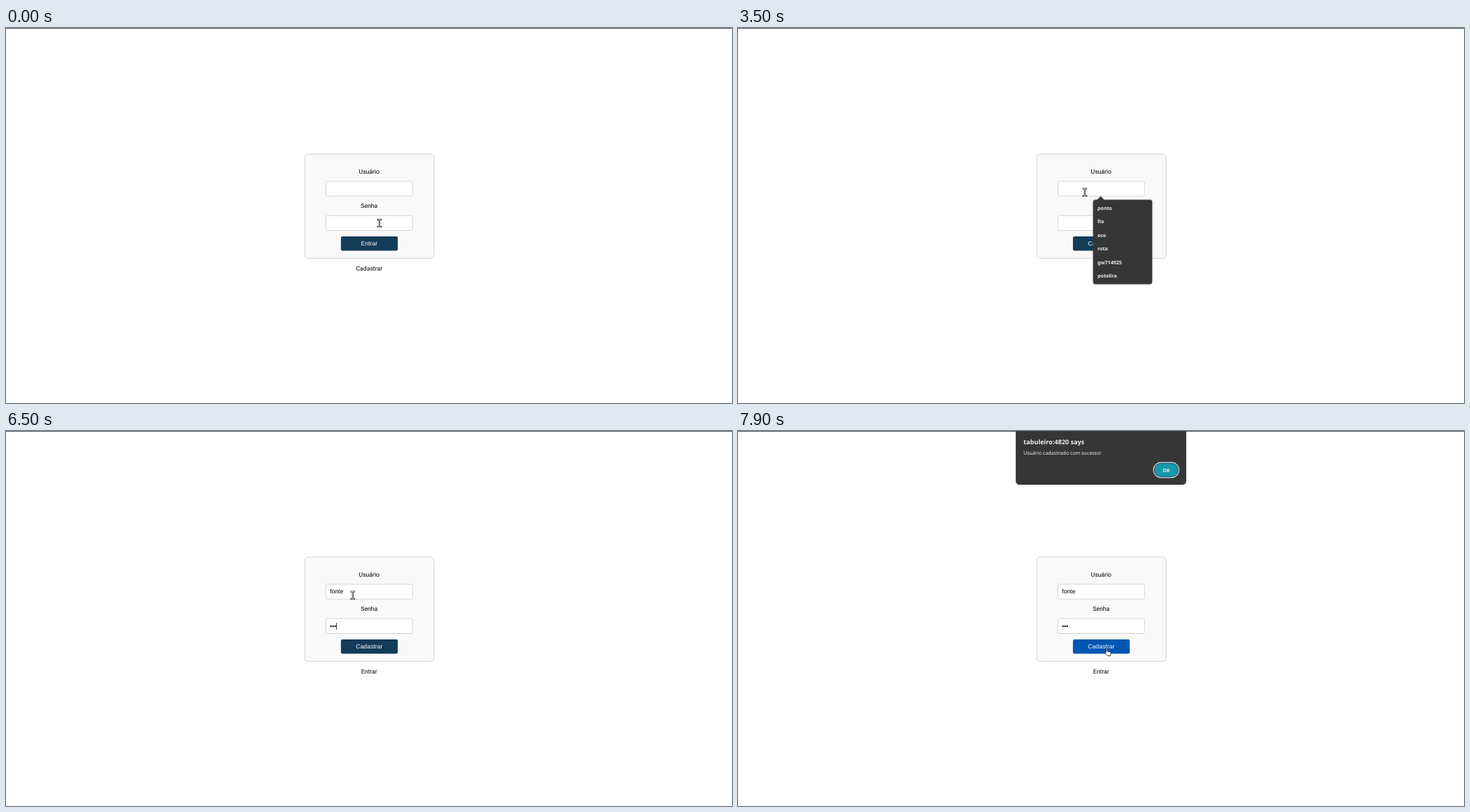
An HTML page for the animation above (8000 ms loop, 1040 px wide and 538 px high).

```html
<!DOCTYPE html>
<html lang="pt">
<head>
<meta charset="utf-8">
<title>Cadastro</title>
<style>
  html, body { margin: 0; width: 100%; height: 100%; overflow: hidden; background: #fff; }
  svg { display: block; width: 100%; height: 100%; }
  text { font: 8.667px Roboto, sans-serif; text-rendering: geometricPrecision; }
  .mid { text-anchor: middle; }
  .sys { font-family: "Liberation Sans", Arial, sans-serif; }
  .card, .field { fill: #f9f9f9; stroke: #cbcbcb; stroke-width: .8; }
  .field { fill: #fff; }
  .dark { fill: #363636; filter: drop-shadow(0 .5px 1px rgba(0, 0, 0, .35)); }
  .ui { font: 600 7.1px "Noto Sans", "Open Sans", sans-serif; fill: #eee; }
  .title { font-size: 9.1px; }
  .body { font-weight: 400; }
</style>
</head>
<body>
<svg viewBox="0 0 1040 538">
  <rect width="1040" height="1" fill="#555"/>
  <rect class="card" x="428" y="180.9" width="185.2" height="149.6" rx="4.3"/>
  <text class="mid" x="520.3" y="209">Usuário</text>
  <rect class="field" x="458.3" y="219.9" width="124" height="21.2" rx="2.2"/>
  <text class="mid" x="520.3" y="258.1">Senha</text>
  <rect class="field" x="458.3" y="269.1" width="124" height="21.4" rx="2.2"/>
  <rect id="button" x="479.8" y="298.9" width="81.4" height="20.6" rx="2.2"/>
  <text id="action" class="mid sys" x="520.3" y="312" fill="#fff"></text>
  <text id="link" class="mid" x="520.3" y="347.8"></text>
  <text id="user" class="sys" x="464" y="233.2"></text>
  <text id="pass" class="sys" x="464" y="282.7"></text>
  <rect id="caret" width=".8" height="9.8"/>

  <g id="menu">
    <path class="dark" d="M512 246.5h2.5l5-5 5 5H590q3.3 0 3.3 3.3V364q0 3.5-3.3 3.5H512q-3.3 0-3.3-3.5V249.8q0-3.3 3.3-3.3z"/>
  </g>

  <g id="dialog">
    <rect class="dark" x="398" y="-20" width="244" height="97" rx="5.5"/>
    <text class="ui title" x="409" y="19">tabuleiro:4820 says</text>
    <text class="ui body" x="409" y="34.4">Usuário cadastrado com sucesso!</text>
    <rect x="595.2" y="45.2" width="36.6" height="21.6" rx="10.8" fill="none" stroke="#c4e4ec" stroke-width="1.2"/>
    <rect x="596.6" y="46.6" width="33.8" height="18.8" rx="9.4" fill="#1797aa"/>
    <text class="ui mid" x="613.5" y="58.6">OK</text>
  </g>

  <g id="cursor" stroke-linejoin="round">
    <g id="beam" fill="none" stroke-linecap="square">
      <path d="M-2.2-5.2H2.2M0-5.2V5.2M-2.2 5.2H2.2" stroke="#111" stroke-width="2.2"/>
      <path d="M-2.2-5.2H2.2M0-5.2V5.2M-2.2 5.2H2.2" stroke="#fff" stroke-width=".8"/>
    </g>
    <path id="hand" d="M-.9 6.5V.9a.9.9 0 0 1 1.8 0V4.5l4 .8q1.4.3 1.2 1.8L5.5 11H1.3L-2.2 7.3q.4-1.3 1.3-.8z" fill="#fff" stroke="#111" stroke-width=".8"/>
    <path id="arrow" d="M0 0V9.5l2.3-2 1.5 3.3 1.5-.7-1.5-3.2h3z" fill="#111" stroke="#fff" stroke-width=".7"/>
  </g>
</svg>
<script>
const $ = id => document.getElementById(id);
const LOOP = 8000;

// Pointer samples: time, shape, hotspot x, hotspot y
const track = [
  [0, 'beam', 535, 280], [200, 'beam', 533, 276], [300, 'beam', 530, 269],
  [400, 'beam', 527, 273], [500, 'beam', 523, 284], [600, 'hand', 519, 302],
  [700, 'arrow', 516, 325], [800, 'hand', 514, 341], [900, 'hand', 513, 344.5],
  [1300, 'arrow', 512, 331], [1400, 'hand', 509, 306], [1500, 'beam', 504, 278],
  [1600, 'arrow', 499, 250], [1700, 'beam', 496.8, 235.7],
  [7100, 'beam', 537, 314.6], [7300, 'hand', 529, 311], [7400, 'hand', 528, 311.5]
];
const caretTimes = [[1800, 2400], [2900, 3500], [4000, 5400], [6000, 7400]];
const userKeys = [4100, 4200, 4300, 4400, 4500];
const passKeys = [6000, 6300, 6500];

['ponto', 'fio', 'eco', 'rota', 'gw714925', 'potelira'].forEach((name, i) => {
  const row = document.createElementNS('http://www.w3.org/2000/svg', 'text');
  row.setAttribute('class', 'ui');
  row.setAttribute('x', 515);
  row.setAttribute('y', 260.6 + i * 19.5);
  row.textContent = name;
  $('menu').append(row);
});

const within = (t, [from, to]) => t >= from && t < to;
const show = (id, on) => { $(id).style.display = on ? '' : 'none'; };
const typed = (text, keys, t) => text.slice(0, keys.filter(k => t >= k).length);

function draw(t) {
  const [, shape, x, y] = track.findLast(step => t >= step[0]);
  for (const id of ['beam', 'hand', 'arrow']) show(id, id === shape);
  $('cursor').setAttribute('transform', `translate(${x} ${y})`);

  const switched = t >= 1100;
  $('action').textContent = switched ? 'Cadastrar' : 'Entrar';
  $('link').textContent = switched ? 'Entrar' : 'Cadastrar';
  $('button').setAttribute('fill', shape === 'hand' && y < 320 ? '#0056b3' : '#133c59');
  $('link').setAttribute('fill', shape === 'hand' && y > 335 ? '#0056b3' : '#000');

  $('user').textContent = typed('fonte', userKeys, t);
  $('pass').textContent = typed('•••', passKeys, t);
  const inPass = t >= 4800;
  const input = $(inPass ? 'pass' : 'user');
  $('caret').setAttribute('x', 464 + (input.textContent ? input.getComputedTextLength() : 0));
  $('caret').setAttribute('y', inPass ? 275.1 : 225.8);
  show('caret', caretTimes.some(span => within(t, span)));

  show('menu', within(t, [1800, 4100]));
  show('dialog', t >= 7700);
  $('dialog').setAttribute('transform', `translate(0 ${t < 7900 ? -8 : 0})`);
}

const start = performance.now();
function frame() {
  draw((performance.now() - start) % LOOP);
  requestAnimationFrame(frame);
}
frame();
</script>
</body>
</html>
```
